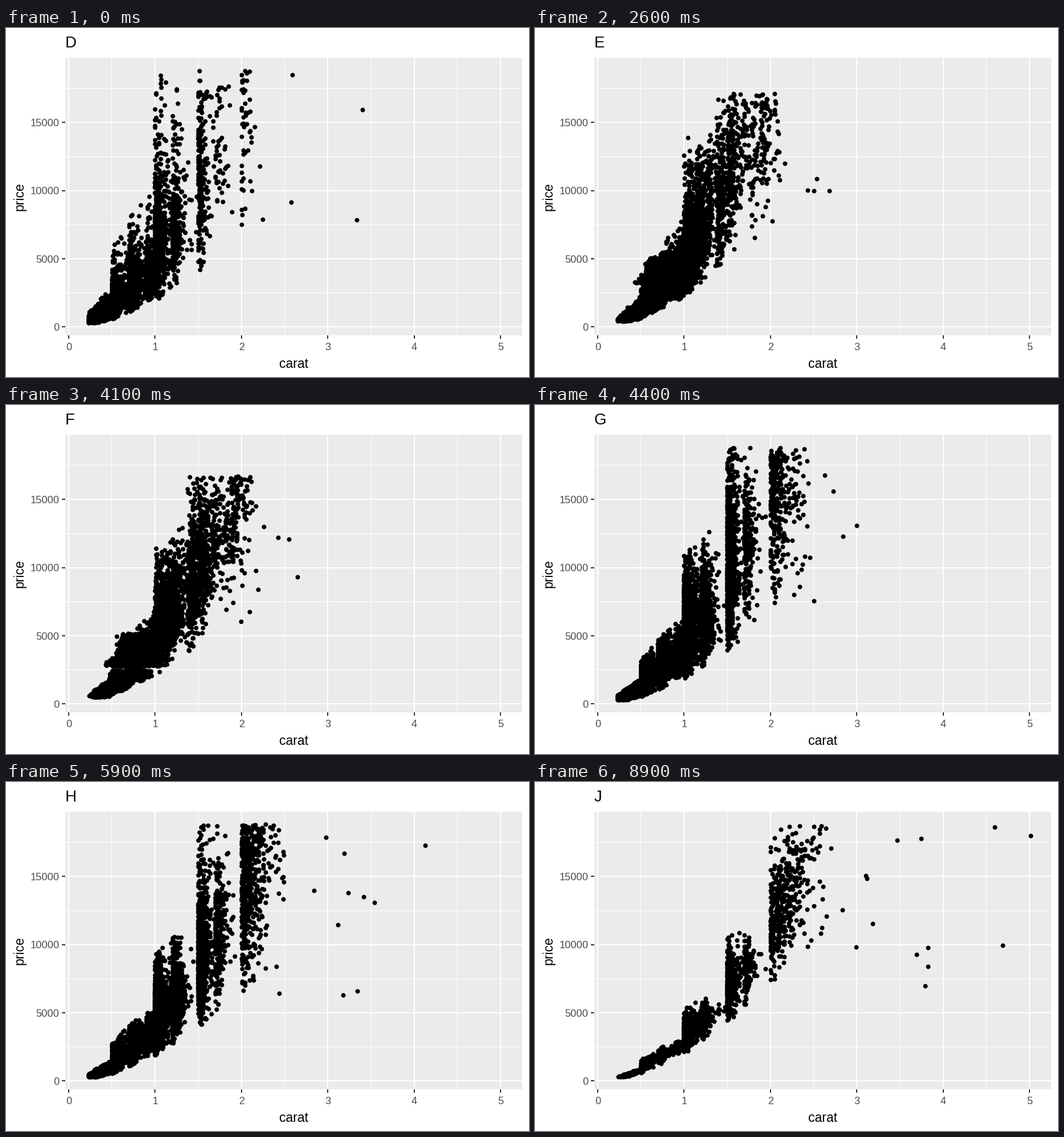
A matplotlib script for the animation above (10 s loop, 917x611 px).

```python
import numpy as np
import matplotlib.pyplot as plt
from matplotlib.animation import FuncAnimation
from matplotlib.patches import Rectangle

W, H, DPI = 917, 611, 100
FRAMES, INTERVAL = 100, 100
HOLD, TWEEN, PERIOD = 11, 4, 15
LEFT, UP, RIGHT, DOWN = 104, 52, 905, 538
SPLIT, CHEAPEST, TOP = 2757, 326, 18823

# popular stone weights and how common each one is
POPULAR = {.23: .05, .3: .24, .4: .13, .5: .18, .7: .17, .9: .05,
           1.0: .13, 1.2: .045, 1.5: .038, 1.7: .008, 2.0: .02}

# grade, stones, share above the split price, heaviest stone and its price
GRADES = [("D", 6775, .41, 3.4, 15960),
          ("E", 9797, .40, 3.05, 10440),
          ("F", 9542, .46, 3.01, 9900),
          ("G", 11292, .472, 3.0, 13100),
          ("H", 8304, .585, 4.13, 17300),
          ("I", 5422, .57, 4.0, 16000),
          ("J", 2808, .64, 5.01, 18000)]

rng = np.random.default_rng(11)


def px(carat):
    return 110 + 151.45 * carat


def py(price):
    return 523.5 - 0.02387 * price


def draw_carats(k, size):
    """Weights bunch just above popular values; worse grades run heavier."""
    base = np.array(list(POPULAR))
    share = np.array(list(POPULAR.values())) * np.maximum(base, .7) ** (.43 * k)
    base = rng.choice(base, size, p=share / share.sum())
    spill = np.where(base < 2, .045, .05 + .03 * k)
    carat = base + rng.exponential(spill)
    loose = rng.random(size) < .04
    carat[loose] = rng.uniform(.25, 1.3, loose.sum())
    return np.floor(carat * 100) / 100


def stones(k, n, dear, heaviest, its_price):
    """Dot positions: dear stones by rising price, then the cheap ones."""
    carat = draw_carats(k, 9 * n)
    # the price range widens at each half carat and for better grades
    floor = (2970 - 80 * k) * carat ** 1.75
    spread = 4 * (1 - .5 * (k / 6) ** 2) * (1 - .8 * (np.minimum(carat, 2) % .5))
    u = .47 + .24 * rng.standard_t(5, len(carat))
    price = floor * spread ** u
    ok = (u > -.3) & (u < 1.1 + .25 * .3 ** k) & (carat < 2.2 + .075 * k)
    ok &= (price > CHEAPEST) & (price < TOP)
    carat, price = carat[ok], price[ok]

    strays = 6 + 2 * k
    n_dear = int(n * dear)
    rich = np.flatnonzero(price >= SPLIT)[:n_dear - strays - 1]
    poor = np.flatnonzero(price < SPLIT)[:n - n_dear]
    keep = np.concatenate([rich, poor])
    carat = np.concatenate([carat[keep], [heaviest],
                            rng.triangular(2.1, 2.1, heaviest, strays)])
    price = np.concatenate([price[keep], [its_price],
                            rng.uniform(6000, TOP, strays)])
    order = np.lexsort((price, price < SPLIT))
    return np.column_stack([px(carat), py(price)])[order]


CLOUDS = [stones(k, *row[1:]) for k, row in enumerate(GRADES)]

plt.rcParams["font.family"] = "Liberation Sans"
fig = plt.figure(figsize=(W / DPI, H / DPI), dpi=DPI, facecolor="white")
ax = fig.add_axes([0, 0, 1, 1])
ax.set(xlim=(0, W), ylim=(H, 0))
ax.axis("off")


def box(x0, y0, x1, y1, color):
    ax.add_patch(Rectangle((x0, y0), x1 - x0, y1 - y0, fc=color, lw=0,
                           antialiased=False))


def label(x, y, text, size, color="black", **kw):
    return ax.text(x, y, text, fontsize=size * 72 / DPI, color=color,
                   va="baseline", **kw)


def vline(carat, width, y0=UP, y1=DOWN, color="white"):
    x = round(px(carat) - width / 2)
    box(x, y0, x + width, y1, color)


def hline(price, width, x0=LEFT, x1=RIGHT, color="white"):
    y = round(py(price) - width / 2)
    box(x0, y, x1, y + width, color)


box(LEFT, UP, RIGHT, DOWN, "#EBEBEB")
for c in range(5):
    vline(c + .5, 1)
for p in range(2500, 20000, 5000):
    hline(p, 1)
for c in range(6):
    vline(c, 2)
    vline(c, 2, DOWN, DOWN + 6, "#333333")
    label(px(c), 563.5, str(c), 18.3, "#4D4D4D", ha="center")
for p in range(0, 20000, 5000):
    hline(p, 2)
    hline(p, 2, LEFT - 6, LEFT, "#333333")
    label(93.5, py(p) + 6.5, str(p), 18.3, "#4D4D4D", ha="right")

label(504.5, 595, "carat", 22.9, ha="center")
label(31, 295, "price", 22.9, ha="center", rotation=90, rotation_mode="anchor")
title = label(104, 34, "", 27.5, ha="left")
dots, = ax.plot([], [], "o", color="black", ms=8 * 72 / DPI, mew=0,
                antialiased=False)


def cloud_at(i):
    """Index of the grade in the title, and the dots, at step i."""
    if i < HOLD:
        return 0, CLOUDS[0]
    leg, step = divmod(i - HOLD, PERIOD)
    t = (step + 1) / TWEEN
    a, b = CLOUDS[leg], CLOUDS[leg + 1]
    if t >= 1:
        return leg + 1, b
    # surplus dots wait for the end of the move to leave or enter
    n = min(len(a), len(b))
    return leg + (t > .5), np.vstack([a[:n] + (b[:n] - a[:n]) * t, a[n:]])


def update(i):
    k, xy = cloud_at(i)
    title.set_text(GRADES[k][0])
    dots.set_data(xy[:, 0], xy[:, 1])
    return title, dots


anim = FuncAnimation(fig, update, frames=FRAMES, interval=INTERVAL,
                     repeat=True, repeat_delay=0, blit=False)
plt.show()
```
